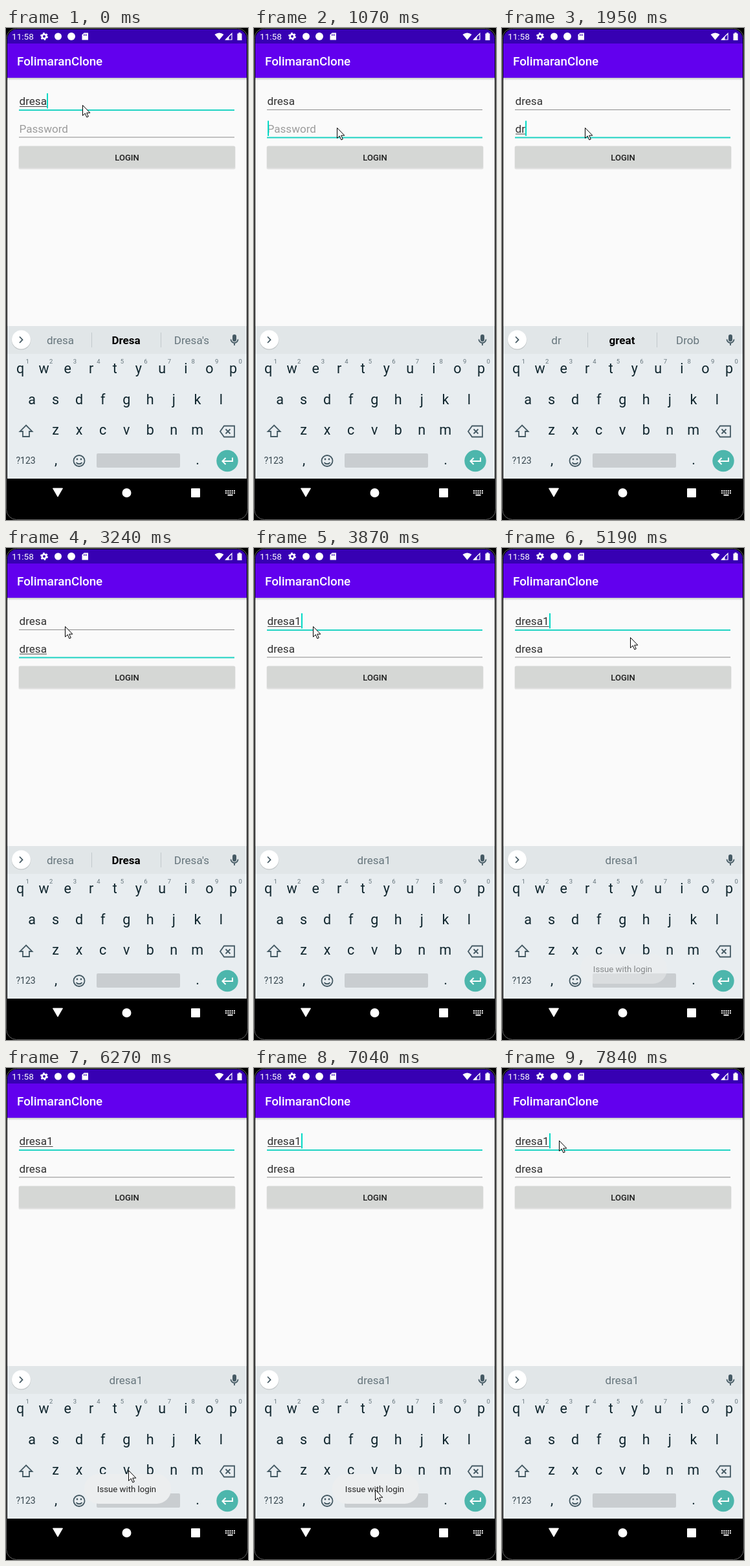
An HTML page that plays this animation: 374 by 761 pixels, repeating every 8000 ms.

```html
<!DOCTYPE html>
<html lang="en">
<head>
<meta charset="utf-8">
<title>Login screen</title>
<style>
  html, body { margin: 0; width: 100%; height: 100%; overflow: hidden; background: #000; }
  svg { display: block; width: 374px; height: 761px; font-family: Roboto, "Noto Sans", sans-serif; }
  .mid { text-anchor: middle; }
  .field { font-size: 17.1px; fill: #303030; }
  .sugg { font-size: 17px; fill: #66757c; text-anchor: middle; }
  .sugg.best { font-weight: 700; fill: #000; }
  .key { font-size: 21.5px; fill: #10262e; text-anchor: middle; }
  .hint { font-size: 9.5px; fill: #66757c; text-anchor: middle; }
  .icon { fill: none; stroke: #455a64; stroke-width: 1.8; }
</style>
</head>
<body>
<svg viewBox="0 0 374 761">
  <defs>
    <clipPath id="screen"><rect x="2" y="2" width="370" height="757" rx="15"/></clipPath>
    <linearGradient id="shade" x2="0" y2="1">
      <stop stop-color="#000" stop-opacity=".22"/><stop offset="1" stop-color="#000" stop-opacity="0"/>
    </linearGradient>
  </defs>
  <rect x=".5" y=".5" width="373" height="760" rx="16" stroke="#666"/>
  <g clip-path="url(#screen)">
    <rect width="374" height="24" fill="#3700b3"/>
    <rect y="24" width="374" height="53" fill="#6200ee"/>
    <rect y="77" width="374" height="384" fill="#fafafa"/>
    <rect y="77" width="374" height="4" fill="url(#shade)"/>
    <rect y="461" width="374" height="43" fill="#e1e6e8"/>
    <rect y="504" width="374" height="193" fill="#e8edf0"/>
  </g>

  <!-- status bar -->
  <g fill="#fff">
    <text x="9" y="18" font-size="13.6">11:58</text>
    <circle cx="59" cy="13" r="3.3" fill="none" stroke="#fff" stroke-width="2.6"/>
    <circle cx="59" cy="13" r="5" fill="none" stroke="#fff" stroke-width="2" stroke-dasharray="2.6 2.636"/>
    <circle cx="80.5" cy="13" r="5.5"/>
    <circle cx="101" cy="13" r="6"/>
    <path d="M120.5 7.500H127V18.500H117.500V10.500Z"/>
    <path d="M120.500 9.500v2.500M122.500 9.500v2.500M124.500 9.500v2.500" stroke="#3700b3"/>
    <path d="M322.500 10Q329.500 5 336.500 10L329.500 18.500Z"/>
    <path d="M349 8.500V18H339.500Z" fill="none" stroke="#fff" stroke-width="1.2"/>
    <path d="M344.500 13V18.500H339Z"/>
    <path d="M357.500 8.500H359.500V7H362.500V8.500H364.500V19H357.500Z"/>
  </g>
  <text x="17" y="58" font-size="18.8" font-weight="500" fill="#fff">FolimaranClone</text>

  <!-- form -->
  <g id="form"></g>
  <rect x="19.500" y="183" width="335" height="35.500" rx="2" fill="#000" opacity=".1"/>
  <rect x="20" y="182.500" width="334" height="34" rx="2" fill="#d5d7d5"/>
  <rect id="press" x="20" y="182.500" width="334" height="34" rx="2"/>
  <text class="mid" x="187" y="204.500" font-size="13" font-weight="500" fill="#1c1c1c">LOGIN</text>

  <!-- suggestion strip -->
  <circle cx="23.500" cy="483" r="14.800" fill="#000" opacity=".14"/>
  <circle cx="23.500" cy="482" r="14.500" fill="#fff"/>
  <path class="icon" d="M21 477.500L25.500 482.200L21 487"/>
  <path id="bars" d="M132.500 471V494M239.500 471V494" stroke="#c3c9cc"/>
  <text class="sugg" x="84" y="489"></text>
  <text class="sugg" x="185.500" y="489"></text>
  <text class="sugg" x="287" y="489"></text>
  <rect x="350" y="474" width="6" height="11" rx="3" fill="#455a64"/>
  <path class="icon" d="M347.500 481.500a5.500 5.500 0 0 0 11 0M353 487v4"/>

  <!-- keyboard -->
  <g id="keys"></g>
  <path class="icon" d="M31 614.500L40.500 624H36V632H26V624H21.500Z"/>
  <path class="icon" d="M337 615.500H353V632.500H337L331 624ZM339.500 620.500l7 7M346.500 620.500l-7 7"/>
  <text x="15.500" y="674" font-size="14" fill="#37474f">?123</text>
  <circle class="icon" cx="113" cy="669.500" r="8.500"/>
  <path class="icon" d="M108.500 672a5 4 0 0 0 9 0"/>
  <circle cx="110" cy="667" r="1.400" fill="#455a64"/>
  <circle cx="116" cy="667" r="1.400" fill="#455a64"/>
  <rect x="140" y="658" width="129" height="22" rx="2" fill="#c9cdd0"/>
  <circle cx="342" cy="669.500" r="16.700" fill="#4db6ac"/>
  <path d="M350 664.500V670H335M339.500 665L334.500 670L339.500 675" fill="none" stroke="#fff" stroke-width="2"/>

  <!-- navigation -->
  <g fill="#fff">
    <path d="M72.500 712H87.500L80 725Z" stroke="#fff" stroke-linejoin="round"/>
    <circle cx="186.500" cy="719" r="7"/>
    <rect x="286" y="712" width="14" height="14" rx="1"/>
    <path d="M339 716H354M339 719.200H354" stroke="#fff" stroke-width="2" stroke-dasharray="2 1.250"/>
    <path d="M342.500 722.500H350.500" stroke="#fff" stroke-width="2"/>
  </g>

  <g id="toast">
    <rect x="121" y="628" width="134" height="46" rx="22" fill="#eceeef"/>
    <text class="mid" x="186.500" y="656" font-size="13.2" fill="#222">Issue with login</text>
  </g>
  <path id="arrow" d="M.5.5V16.500L4.200 13L6.800 19L9.300 18L6.700 12.200H11.800Z" fill="#fff" stroke="#000"/>
</svg>

<script>
const LOOP = 8000, BEAT = 125, BLINK = 480;
const NAME = "dresa";
const $ = id => document.getElementById(id);

function set(el, attrs) {
  for (const name in attrs) el.setAttribute(name, attrs[name]);
  return el;
}

function add(parent, tag, attrs, text = "") {
  const el = set(document.createElementNS("http://www.w3.org/2000/svg", tag), attrs);
  el.textContent = text;
  return parent.appendChild(el);
}

// Keyboard rows: letters, first key centre, baseline
[["qwertyuiop", 22, 534], ["asdfghjkl", 40, 582], ["zxcvbnm", 76.5, 629]].forEach(([row, x0, y], r) =>
  [...row].forEach((letter, i) => {
    const x = x0 + i * 36.55;
    add($("keys"), "text", { class: "key", x, y }, letter);
    if (!r) add($("keys"), "text", { class: "hint", x: x + 11.2, y: 519 }, (i + 1) % 10);
  }));
add($("keys"), "text", { class: "key", x: 77, y: 675 }, ",");
add($("keys"), "text", { class: "key", x: 296, y: 675 }, ".");

function makeField(top) {
  const g = add($("form"), "g", { transform: `translate(0 ${top})` });
  return {
    line: add(g, "rect", { x: 20, y: 25, width: 333 }),
    mark: add(g, "rect", { x: 21, y: 20, height: 1, fill: "#444" }),
    label: add(g, "text", { class: "field", x: 20.5, y: 18.4 }),
    caret: add(g, "rect", { y: 0, width: 2, height: 23.5, fill: "#03dac5" })
  };
}
const fields = [makeField(101), makeField(143.5)];

// Input events: time, focused field, user name, password
const events = [
  [-220, 0, NAME, ""],
  [940, 1, NAME, ""],
  [1950, 1, NAME, "dr"],
  [2320, 1, NAME, "dre"],
  [2440, 1, NAME, "dres"],
  [2570, 1, NAME, NAME],
  [3370, 0, NAME, NAME],
  [3870, 0, NAME + "1", NAME]
];
const guesses = {
  dr: ["great", "Drob"], dre: ["dream", "dress"], dres: ["dress", "dressed"], [NAME]: ["Dresa", "Dresa's"]
};

// Pointer stops: time, x, y
const stops = [
  [0, 118, 119], [375, 118, 151], [750, 128, 154], [2875, 128, 154], [3250, 91, 121],
  [4250, 91, 121], [4500, 180, 197], [5250, 198, 138], [5875, 198, 138], [6125, 184, 611],
  [6250, 189, 622], [6750, 145, 652], [7250, 228, 652], [7750, 88, 123], [7875, 88, 112]
];

const ramp = (t, from, to) => Math.min(1, Math.max(0, (t - from) / (to - from)));

function pointerAt(t) {
  const i = Math.max(1, stops.findIndex(stop => stop[0] >= t));
  const [t0, x0, y0] = stops[i - 1], [t1, x1, y1] = stops[i];
  const k = ramp(t, t0, t1);
  return [Math.round(x0 + (x1 - x0) * k), Math.round(y0 + (y1 - y0) * k)];
}

function drawField(field, text, focused, caretOn) {
  field.label.textContent = text || "Password";
  field.label.style.fill = text ? "" : "#9c9c9c";
  const width = text ? field.label.getComputedTextLength() : 0;
  set(field.line, { height: focused ? 2 : 1, fill: focused ? "#1fd3c3" : "#8c8c8c" });
  set(field.mark, { width: focused ? Math.max(0, width - 0.5) : 0 });
  set(field.caret, { x: Math.round(20.6 + width), opacity: focused && caretOn ? 1 : 0 });
}

const slots = document.querySelectorAll(".sugg");

function drawSuggestions(text) {
  const known = guesses[text];
  const words = known ? [text, ...known] : ["", text, ""];
  words.forEach((word, i) => slots[i].textContent = word);
  slots[1].classList.toggle("best", !!known);
  set($("bars"), { opacity: known ? 1 : 0 });
}

function draw(t) {
  const [since, active, ...texts] = events.findLast(event => event[0] <= t);
  const caretOn = Math.floor((t - since) / BLINK) % 2 === 0;
  fields.forEach((field, i) => drawField(field, texts[i], active === i, caretOn));
  drawSuggestions(texts[active]);

  // Pointer and fades advance in beats, as a screen recorder samples them
  const beat = Math.min(Math.round(t / BEAT) * BEAT, LOOP - BEAT);
  set($("arrow"), { transform: `translate(${pointerAt(beat)})` });
  set($("toast"), { opacity: ramp(beat, 5000, 5500) * ramp(beat, 7750, 7375) });
  set($("press"), { opacity: t < 4650 ? 0 : 0.04 * ramp(beat, 5000, 4625) });
}

const start = performance.now();
function tick() {
  draw((performance.now() - start) % LOOP);
  requestAnimationFrame(tick);
}
tick();
</script>
</body>
</html>
```
